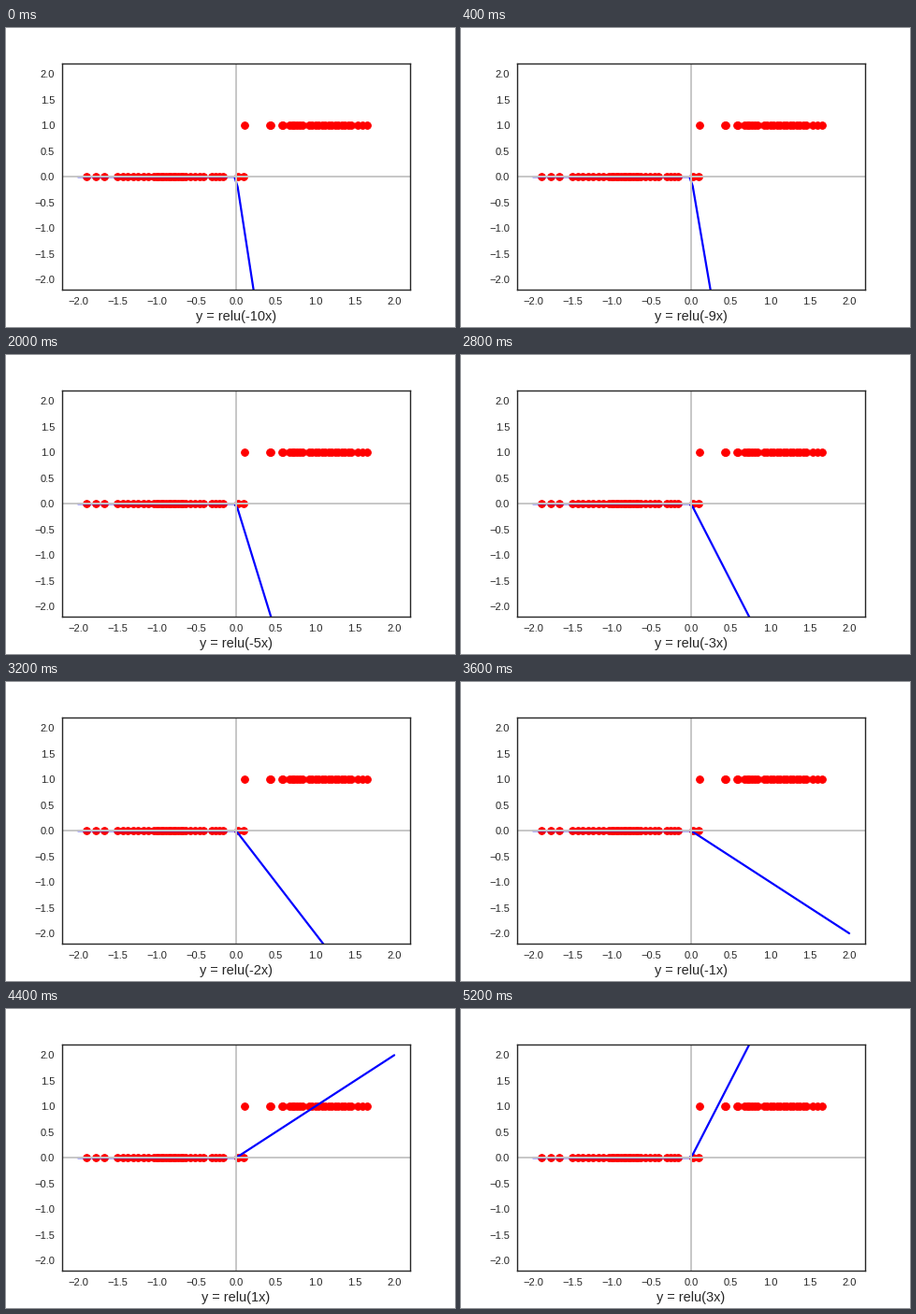
Animation, 480 px wide and 320 px high, one loop 5.6 s. Source, as a matplotlib script:

```python
import numpy as np
import matplotlib.pyplot as plt
from matplotlib.animation import FuncAnimation

INK, GUIDE = "0.15", "0.78"
WEIGHTS = range(-10, 4)
LIMIT = 2.2

plt.rcParams.update({
    "font.family": "Liberation Sans",
    "axes.labelcolor": INK,
    "axes.edgecolor": INK,
    "axes.linewidth": 1.25,
    "xtick.color": INK,
    "ytick.color": INK,
    "xtick.major.size": 0,
    "ytick.major.size": 0,
    "xtick.major.pad": 7,
    "ytick.major.pad": 7,
    "lines.linewidth": 1.75,
    "lines.solid_capstyle": "round",
})

# Evenly filled runs of samples: first x, last x, count
ZEROS = [(-1.89, -1.67, 3), (-1.5, -1.11, 7), (-1.04, -0.64, 14),
         (-0.58, -0.41, 4), (-0.31, -0.17, 4), (0.02, 0.1, 2)]
ONES = [(0.11, 0.11, 1), (0.42, 0.44, 2), (0.58, 0.59, 2),
        (0.67, 0.84, 6), (0.92, 1.46, 14), (1.54, 1.66, 3)]


def scatter_runs(ax, runs, level):
    xs = np.concatenate([np.linspace(*run) for run in runs])
    ax.scatter(xs, np.full(len(xs), level), s=49, color="red", linewidth=0.8)


fig, ax = plt.subplots(figsize=(6, 4), dpi=80)
fig.subplots_adjust(left=0.125, right=0.9, bottom=0.125, top=0.88)
ticks = np.arange(-2, 2.1, 0.5)
ax.set(xlim=(-LIMIT, LIMIT), ylim=(-LIMIT, LIMIT), xticks=ticks, yticks=ticks)
ax.tick_params(labelsize=10)

scatter_runs(ax, ZEROS, 0)
scatter_runs(ax, ONES, 1)

x = np.linspace(-2, 2, 100)
relu = np.maximum(x, 0)
curve, = ax.plot(x, relu, color="blue", linewidth=2)
ax.axhline(0, color=GUIDE)
ax.axvline(0, color=GUIDE)
label = ax.set_xlabel("", fontsize=13)


def update(i):
    w = WEIGHTS[i]
    curve.set_ydata(w * relu)
    label.set_text(f"y = relu({w}x)")
    return curve, label


anim = FuncAnimation(fig, update, frames=len(WEIGHTS), interval=400,
                     init_func=lambda: update(0), repeat=True, repeat_delay=0)
plt.show()
```
